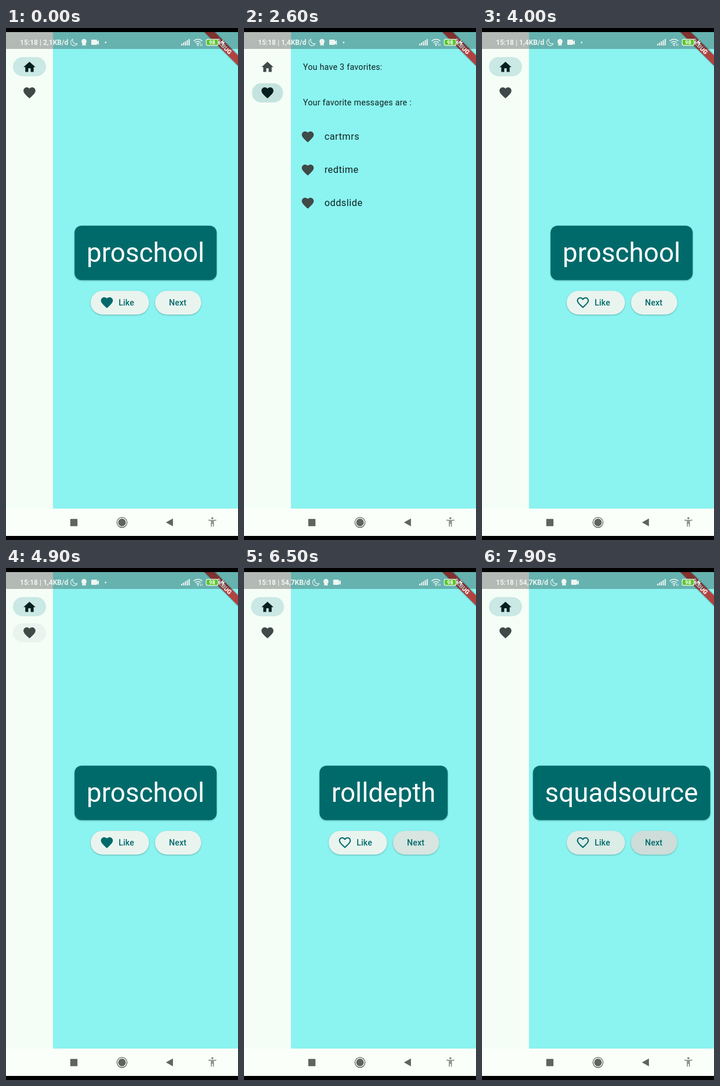
These frames come from a looping animation (400x880 px, 8 s). An HTML page:

```html
<!DOCTYPE html>
<html lang="en">
<head>
<meta charset="utf-8">
<title>Word favorites app</title>
<style>
  html, body { margin: 0; width: 100%; height: 100%; overflow: hidden; background: #000; }
  svg { display: block; width: 400px; height: 880px; font-family: Roboto, sans-serif; }
  .word { font-size: 45.8px; fill: #fff; text-anchor: middle; }
  .label { font-size: 14.26px; font-weight: 500; letter-spacing: .1px; fill: #006a6a; }
  .body { font-size: 14.26px; letter-spacing: .255px; fill: #0d2322; }
  .item { font-size: 16.3px; letter-spacing: .51px; fill: #0d2322; }
  .status { font-size: 12px; font-weight: 700; fill: #eef5f2; }
</style>
</head>
<body>
<svg viewBox="0 0 400 880">
  <defs>
    <path id="heart" d="M12 21.35l-1.45-1.32C5.4 15.36 2 12.28 2 8.5 2 5.42 4.42 3 7.5 3c1.74 0 3.41.81 4.5 2.09C13.09 3.81 14.76 3 16.5 3 19.58 3 22 5.42 22 8.5c0 3.78-3.4 6.86-8.55 11.54z"/>
    <path id="heartLine" d="M16.5 3c-1.74 0-3.41.81-4.5 2.09C10.91 3.81 9.24 3 7.5 3 4.42 3 2 5.42 2 8.5c0 3.78 3.4 6.86 8.55 11.54L12 21.35l1.45-1.32C18.6 15.36 22 12.28 22 8.5 22 5.42 19.58 3 16.5 3zm-4.4 15.55l-.1.1-.1-.1C7.14 14.24 4 11.39 4 8.5 4 6.5 5.5 5 7.5 5c1.54 0 3.04.99 3.57 2.36h1.87C13.46 5.99 14.96 5 16.5 5c2 0 3.5 1.5 3.5 3.5 0 2.89-3.14 5.74-7.9 10.05z"/>
    <path id="house" d="M10 20v-6h4v6h5v-8h3L12 3 2 12h3v8z"/>
    <radialGradient id="ink">
      <stop offset="0" stop-color="#00504c" stop-opacity=".17"/>
      <stop offset=".55" stop-color="#00504c" stop-opacity=".13"/>
      <stop offset="1" stop-color="#00504c" stop-opacity="0"/>
    </radialGradient>
    <filter id="lift" x="-10%" y="-20%" width="120%" height="150%">
      <feDropShadow dx="0" dy="1" stdDeviation=".8" flood-color="#003434" flood-opacity=".4"/>
    </filter>
    <filter id="soft"><feGaussianBlur stdDeviation="2.5"/></filter>
    <clipPath id="app"><rect y="7" width="400" height="866"/></clipPath>
    <clipPath id="likeClip"><rect x="146" y="451.7" width="100.5" height="40.7" rx="20.35"/></clipPath>
  </defs>

  <rect width="400" height="880" fill="#000"/>
  <rect y="7" width="400" height="819" fill="#8bf3f0"/>
  <rect y="7" width="81" height="819" fill="#f5fdf7"/>
  <rect y="826" width="400" height="47" fill="#fafff9"/>

  <g id="rail"></g>

  <g id="homePage">
    <rect id="card" y="339.7" height="93.5" rx="12.2" fill="#006a6a" filter="url(#lift)"/>
    <text id="word" class="word" x="240.6" y="402.2"></text>
    <rect x="146" y="451.7" width="100.5" height="40.7" rx="20.35" fill="#eaf4ef" filter="url(#lift)"/>
    <g clip-path="url(#likeClip)">
      <rect id="likeTint" x="146" y="451" width="101" height="42" fill="#006a6a"/>
      <circle id="likeInk" cx="188" cy="472" fill="url(#ink)"/>
    </g>
    <use id="likeOn" href="#heart" fill="#006a6a" transform="translate(161.6 459.6) scale(1.03)"/>
    <use id="likeOff" href="#heartLine" fill="#006a6a" transform="translate(161.6 459.6) scale(1.03)"/>
    <text class="label" x="194.3" y="477">Like</text>
    <rect x="257" y="451.7" width="79.5" height="40.7" rx="20.35" fill="#eaf4ef" filter="url(#lift)"/>
    <rect id="nextTint" x="257" y="451.7" width="79.5" height="40.7" rx="20.35" fill="#003c3a"/>
    <text class="label" x="281" y="477">Next</text>
  </g>

  <g id="favPage">
    <text id="count" class="body" x="101.8" y="71.6"></text>
    <text class="body" x="101.8" y="132.7">Your favorite messages are :</text>
    <g id="list"></g>
  </g>

  <g clip-path="url(#app)">
    <g transform="translate(400 7) rotate(45) scale(1.0185)">
      <rect x="-45" y="28" width="90" height="12" fill="#000" opacity=".5" filter="url(#soft)"/>
      <rect x="-45" y="28" width="90" height="12" fill="#b04340"/>
      <text x="0" y="37.6" text-anchor="middle" font-size="10.2" font-weight="900" fill="#fff">DEBUG</text>
    </g>
  </g>

  <rect y="7" width="400" height="29" fill="#000" opacity=".27"/>
  <text id="rate" class="status" x="24" y="29.2"></text>
  <g id="notices" fill="#eef5f2">
    <path d="M115.2 19.2a5.8 5.8 0 1 0 7.5 7.6a6 6 0 0 1-7.5-7.6z" fill="none" stroke="#eef5f2" stroke-width="1.1"/>
    <circle cx="134.5" cy="23.2" r="4.4"/>
    <path d="M131.5 26h6v4.6l-3-1.2-3 1.2z"/>
    <path d="M148 20h8q1 0 1 1v2.4l3-2.6v8.4l-3-2.6V28q0 1-1 1h-8q-1 0-1-1v-7q0-1 1-1z"/>
    <circle id="dot" cx="171.8" cy="25" r="1.4"/>
  </g>
  <g id="signal" fill="#eef5f2"></g>
  <g fill="none" stroke="#eef5f2" stroke-width="1.4">
    <path d="M323.5 22.4q7.5-6.2 15 0M326 25.2q5-4 10 0M328.4 27.8q2.6-2 5.2 0"/>
    <path d="M335.5 27v4M338 27v4" stroke-width=".9"/>
  </g>
  <circle cx="331" cy="29.8" r="1.3" fill="#eef5f2"/>
  <rect x="345.2" y="19.3" width="20.6" height="10.6" rx="2.6" fill="#5cc52e" stroke="#f3f8f5" stroke-width="1.2"/>
  <rect x="367" y="22.5" width="1.4" height="4.4" fill="#f3f8f5"/>
  <text x="355.5" y="28" text-anchor="middle" font-size="9" font-weight="700" fill="#fff">98</text>
  <path d="M375 19.5l-4.5 6h3l-1 5 5-6.4h-3.2z" fill="#eef5f2"/>

  <g fill="#5f645f">
    <rect x="110.8" y="843.8" width="12.4" height="12.4" rx=".8"/>
    <circle cx="200" cy="849.8" r="8.7" fill="none" stroke="#5f645f" stroke-width="1.3"/>
    <circle cx="200" cy="849.8" r="6.6"/>
    <path d="M275.8 849.8L287.8 843v13.6z"/>
    <circle cx="355.8" cy="842.6" r="1.8" fill="#7d827d"/>
    <path d="M349 845.8q6.8 1.6 13.6 0M354 846.5V857M357.6 846.5V857M354 851.5h3.6M355.8 846.5v4" fill="none" stroke="#7d827d" stroke-width="1.5"/>
  </g>
</svg>

<script>
const LOOP = 8000;
const RAIL_X = 40.5;
const SWITCHES = [
  { at: 2500, page: 1 }, { at: 3500, page: 0 },
  { at: 5000, page: 1 }, { at: 5700, page: 0 }
];
const WORDS = [
  { at: 0, text: "proschool", width: 245 },
  { at: 6400, text: "rolldepth", width: 221 },
  { at: 7750, text: "squadsource", width: 305.6 }
];
const RATES = [
  { at: 0, text: "2,1" }, { at: 1100, text: "1,4" }, { at: 5150, text: "54,7" }
];
const FAVORITES = ["cartmrs", "redtime", "oddslide", "proschool"];

const $ = id => document.getElementById(id);
const set = (el, attrs) => Object.entries(attrs).forEach(([k, v]) => el.setAttribute(k, v));
const show = (el, on) => set(el, { visibility: on ? "inherit" : "hidden" });
const clamp = x => Math.min(1, Math.max(0, x));
const easeOut = x => 1 - (1 - x) ** 3;
const latest = (list, t) => list.filter(e => e.at <= t).pop();

// Rises quickly at start, holds until release, then fades out.
const press = (t, start, release, fade = 350) =>
  clamp((t - start) / 50) * clamp(1 - (t - release) / fade);

function make(parent, tag, attrs, text = "") {
  const el = document.createElementNS("http://www.w3.org/2000/svg", tag);
  set(el, attrs);
  el.textContent = text;
  return parent.appendChild(el);
}

const icon = (parent, href, x, y, fill) => make(parent, "use", {
  href, fill, transform: `translate(${x - 12.4} ${y - 12.4}) scale(1.03)`
});

const tabs = [["#house", 66.5], ["#heart", 111.5]].map(([href, y]) => {
  const pill = fill => make($("rail"), "rect", {
    x: -28.5, y: -16.4, width: 57, height: 32.8, rx: 16.4, fill
  });
  const tab = { y, pill: pill("#cae8e4"), tint: pill("#003c32") };
  set(tab.tint, { transform: `translate(${RAIL_X} ${y})` });
  return tab;
});
const railInk = make($("rail"), "circle", { cx: 35, cy: 58, fill: "url(#ink)" });
tabs[0].icon = icon($("rail"), "#house", RAIL_X, 67.3);
tabs[1].icon = icon($("rail"), "#heart", RAIL_X, 111.3);

const rows = FAVORITES.map((name, i) => {
  const row = make($("list"), "g", { transform: `translate(0 ${187 + 57 * i})` });
  icon(row, "#heart", 110, 0, "#3f4947");
  make(row, "text", { class: "item", x: 138.7, y: 5.2 }, name);
  return row;
});

for (let i = 0; i < 5; i++) {
  const h = 3 + i * 2;
  make($("signal"), "rect", { x: 302 + i * 3.2, y: 30 - h, width: 2, height: h });
}

function drawRail(t) {
  const { at, page } = latest(SWITCHES, t) || { at: -LOOP, page: 0 };
  const grow = easeOut(clamp((t - at) / 200));
  tabs.forEach((tab, i) => {
    const active = i === page;
    const taps = SWITCHES.filter(s => s.page === i);
    set(tab.pill, {
      transform: `translate(${RAIL_X} ${tab.y}) scale(${active ? .4 + .6 * grow : 1} 1)`,
      opacity: active ? clamp((t - at) / 100) : 1 - clamp((t - at) / 100)
    });
    set(tab.tint, { opacity: .045 * Math.max(...taps.map(s => press(t, s.at - 150, s.at, 250))) });
    set(tab.icon, { fill: active ? "#051f1f" : "#3f4947" });
  });
  set(railInk, { r: 9 + 12 * clamp((t - 5600) / 250), opacity: press(t, 5550, 5650, 200) });
  return page;
}

function drawHome(t) {
  const { text, width } = latest(WORDS, t);
  const liked = t < 1300 || (t >= 4300 && t < 6400);
  set($("card"), { x: 240.7 - width / 2, width });
  $("word").textContent = text;
  show($("likeOn"), liked);
  show($("likeOff"), !liked);
  const inkStart = t < 3000 ? 1200 : 4200;
  set($("likeInk"), {
    r: 20 + 32 * clamp((t - inkStart) / 220),
    opacity: press(t, inkStart, inkStart + 220, 330)
  });
  set($("likeTint"), { opacity: .06 * press(t, 7650, 7950) });
  set($("nextTint"), {
    opacity: Math.max(.11 * press(t, 6250, 6400), .17 * press(t, 7600, 7800))
  });
}

function drawFavorites(t) {
  const count = t < 4300 ? 3 : 4;
  $("count").textContent = `You have ${count} favorites:`;
  rows.forEach((row, i) => show(row, i < count));
}

function draw(t) {
  const page = drawRail(t);
  show($("homePage"), page === 0);
  show($("favPage"), page === 1);
  drawHome(t);
  drawFavorites(t);
  const rate = latest(RATES, t).text;
  const wide = rate.length > 3;
  $("rate").textContent = `15:18 | ${rate}KB/d`;
  set($("notices"), { transform: `translate(${wide ? 6.8 : 0} 0)` });
  show($("dot"), !wide);
}

const start = performance.now();
function frame() {
  draw((performance.now() - start) % LOOP);
  requestAnimationFrame(frame);
}
frame();
</script>
</body>
</html>
```
